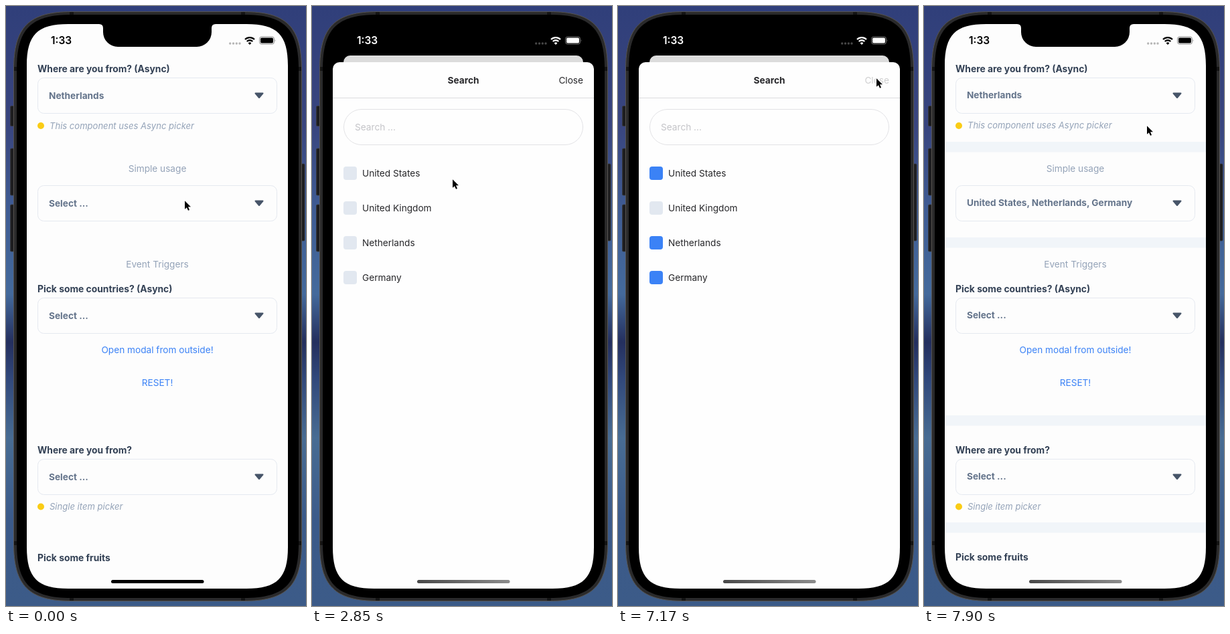
An HTML page that plays this animation: 448 by 897 pixels, repeating every 8000 ms.

```html
<!DOCTYPE html>
<html lang="en">
<head>
<meta charset="utf-8">
<title>Picker demo</title>
<style>
html, body { margin: 0; width: 100%; height: 100%; overflow: hidden; background: #34457f; }
svg { display: block; width: 100vw; height: 100vh; }
text { font: 400 13.65px Inter, "Open Sans", sans-serif; fill: #27272a; white-space: pre; }
.bold { font-weight: 700; }
.label { font-size: 13.85px; fill: #334155; }
.value { fill: #64748b; }
.hint { font-style: italic; font-size: 13.05px; fill: #94a3b8; }
.mid { text-anchor: middle; }
.end { text-anchor: end; }
.muted { fill: #94a3b8; }
.link { fill: #3b82f6; }
.faint { fill: #c4c4c8; }
.clock { font-weight: 600; font-size: 15.5px; fill: inherit; }
</style>
</head>
<body>
<svg viewBox="0 0 448 897" preserveAspectRatio="none">
  <defs>
    <linearGradient id="wall" x2="0" y2="1">
      <stop offset="0" stop-color="#303f7a"/>
      <stop offset=".2" stop-color="#39457f"/>
      <stop offset=".34" stop-color="#3f5c94"/>
      <stop offset=".48" stop-color="#446a9c"/>
      <stop offset=".56" stop-color="#242f5e"/>
      <stop offset=".62" stop-color="#31487b"/>
      <stop offset=".72" stop-color="#486c93"/>
      <stop offset=".86" stop-color="#3b5a8a"/>
      <stop offset="1" stop-color="#3c5b88"/>
    </linearGradient>
    <linearGradient id="bar">
      <stop offset="0" stop-color="#484848"/>
      <stop offset="1" stop-color="#8c8c8c"/>
    </linearGradient>
    <clipPath id="screen"><path id="glass"/></clipPath>
  </defs>

  <rect width="448" height="897" fill="url(#wall)"/>
  <g fill="#1d1d1f" stroke="#3a3a3c" stroke-width=".8">
    <rect x="6.5" y="149.5" width="8" height="30" rx="1.5"/>
    <rect x="6.5" y="213" width="8" height="70" rx="1.5"/>
    <rect x="6.5" y="297" width="8" height="70" rx="1.5"/>
    <rect x="438" y="236" width="8" height="115" rx="1.5"/>
  </g>
  <path id="body" fill="#2a2a2b" stroke="#56534f"/>
  <path d="M12 94h5M436 94h5M12 803h5M436 803h5M98 9v5M354 9v5M98 884v5M354 884v5" stroke="#141414" stroke-width="6"/>
  <path id="bezel"/>

  <g clip-path="url(#screen)">
    <g id="page">
      <rect class="card" x="31" y="27" width="390" height="844" fill="#fdfdfd"/>
      <g id="content"></g>
      <rect class="card" id="dim" x="31" y="27" width="390" height="844"/>
    </g>
    <path d="M139 26v1q6 0 6 6v6a22 22 0 0 0 22 22h118a22 22 0 0 0 22-22v-6q0-6 6-6v-1z"/>
    <g id="status">
      <text class="clock" x="67" y="57">1:33</text>
      <g opacity=".28"><circle cx="334.7" cy="56" r="1.7"/><circle cx="339.5" cy="56" r="1.7"/><circle cx="344.3" cy="56" r="1.7"/><circle cx="349" cy="56" r="1.7"/></g>
      <path d="M357 50a10 10 0 0 1 14 0M359.7 53a6.2 6.2 0 0 1 8.6 0" fill="none" stroke="currentColor" stroke-width="2.3"/>
      <path d="M364 58l-2.4-2.5a3.4 3.4 0 0 1 4.8 0z"/>
      <rect x="378.5" y="46" width="22" height="11" rx="3.2" fill="none" stroke="currentColor" stroke-opacity=".45"/>
      <rect x="380" y="47.5" width="19" height="8" rx="1.8"/>
      <path d="M401.8 49.8q1.5 1.7 0 3.6z" opacity=".5"/>
    </g>
    <g id="sheet"></g>
    <rect id="home" x="157" y="858" width="138.5" height="5" rx="2.5"/>
  </g>
  <path id="cursor" d="M1 1.2V13.8L3.9 11.2 6 15.8 8 14.9 6 10.3H10Z" stroke="#fff" stroke-width="1.8" paint-order="stroke"/>
</svg>
<script>
const LOOP = 8000, OPEN = 1963, CLOSE = 7239.4;
const $ = id => document.getElementById(id);

// Rectangle with smooth, continuous-curvature corners
function squircle(x, y, w, h, r) {
  const a = 1.32 * r, k = .34 * r, d = a - k;
  return `M${x} ${y + a}c0 ${-d} ${k} ${-a} ${a} ${-a}h${w - 2 * a}c${d} 0 ${a} ${k} ${a} ${a}` +
    `v${h - 2 * a}c0 ${d} ${-k} ${a} ${-a} ${a}h${2 * a - w}c${-d} 0 ${-a} ${-k} ${-a} ${-a}z`;
}
$("glass").setAttribute("d", squircle(31, 27, 390, 844, 47));
$("bezel").setAttribute("d", squircle(16, 13, 421, 872, 62));
$("body").setAttribute("d", squircle(11.5, 8.5, 430, 881, 66));

const text = (x, y, cls, s, id = "") => `<text id="${id}" x="${x}" y="${y}" class="${cls}">${s}</text>`;
const label = (y, s) => text(47, y, "bold label", s);
const hint = (y, s) => `<circle cx="52" cy="${y}" r="5" fill="#facc15"/>` + text(65, y + 4.5, "hint", s);
const picker = (y, s, id) =>
  `<rect x="47.5" y="${y + .5}" width="357" height="53" rx="9" fill="none" stroke="#e5e9f0"/>` +
  text(64, y + 31.5, "bold value", s, id) +
  `<path d="M372.5 ${y + 23.5}h11l-5.5 6.5z" fill="#475569" stroke="#475569" stroke-width="2" stroke-linejoin="round"/>`;
const band = y => `<rect x="31" y="${y}" width="390" height="15.5" fill="#f1f5f9"/>`;

$("content").innerHTML =
  `<g id="bands">${[203, 346, 612, 772].map(band).join("")}</g>` +
  label(99, "Where are you from? (Async)") + picker(107, "Netherlands") +
  hint(179, "This component uses Async picker") +
  text(226, 248, "mid muted", "Simple usage") + picker(268, "", "choice") +
  text(226, 391, "mid muted", "Event Triggers") +
  label(428, "Pick some countries? (Async)") + picker(436, "Select ...") +
  text(226, 519, "mid link", "Open modal from outside!") +
  text(226, 568, "mid link", "RESET!") +
  label(669, "Where are you from?") + picker(677, "Select ...") +
  hint(748.5, "Single item picker") +
  label(829.5, "Pick some fruits");

// Countries and the moment each is ticked
const rows = [["United States", 3290], ["United Kingdom", Infinity], ["Netherlands", 4480], ["Germany", 5680]];
$("sheet").innerHTML =
  `<rect x="31" width="390" height="860" rx="10" fill="#fefefe"/>` +
  text(226, 31.5, "mid bold", "Search") + text(405, 31.5, "end", "Close", "close") +
  `<path d="M31 53.5h390" stroke="#dcdcde"/>` +
  `<rect x="47.5" y="70.5" width="357" height="53" rx="26.5" fill="none" stroke="#e2e2e5"/>` +
  text(64, 102, "faint", "Search ...") +
  rows.map(([name], i) => `<rect class="box" x="47" y="${156 + 52 * i}" width="20" height="20" rx="4"/>` +
    text(75, 171 + 52 * i, "", name)).join("");
const boxes = document.querySelectorAll(".box"), cards = document.querySelectorAll(".card");

// Pointer path: time, x, y
const path = [
  [0, 266, 290], [900, 266, 290], [1200, 272, 293], [2250, 272, 293], [2700, 266, 293],
  [2850, 209, 258], [2990, 150, 244], [3140, 118, 246], [3440, 118, 246], [3880, 142, 293],
  [4180, 120, 340], [4630, 120, 346], [4930, 130, 346], [5230, 132, 376], [5380, 122, 400],
  [5680, 122, 402], [6120, 308, 171], [6270, 370, 120], [6420, 383, 108], [6570, 385, 107],
  [7450, 385, 107], [7900, 332, 178], [LOOP, 332, 178]
];
function pointer(t) {
  const i = path.findIndex(k => k[0] > t);
  const [t0, x0, y0] = path[i - 1], [t1, x1, y1] = path[i], u = (t - t0) / (t1 - t0);
  return [x0 + (x1 - x0) * u, y0 + (y1 - y0) * u];
}

const restarts = [7900, 7310, 6120, 3880, 2990, 0];
function hold(t) {
  const a = restarts.find(r => r <= t);
  return a + Math.floor((t - a) / 150) * 150;
}

// Critically damped spring from 0 to 1
function spring(ms) {
  const x = Math.max(0, ms) * .01826;
  return 1 - (1 + x) * Math.exp(-x);
}

function draw(t) {
  const p = spring(t - OPEN) - spring(t - CLOSE);
  const scale = 1 - .082 * p;
  $("page").setAttribute("transform", `translate(226 ${27 + 47 * p}) scale(${scale}) translate(-226 -27)`);
  cards.forEach(c => c.setAttribute("rx", (40 - 30 * p) / scale));
  $("dim").setAttribute("opacity", .13 * p);
  $("sheet").setAttribute("transform", `translate(0 ${871 - 787 * p})`);
  $("sheet").style.display = p > .003 ? "" : "none";

  const light = t > OPEN && t < CLOSE;
  $("status").style.fill = $("status").style.color = light ? "#fff" : "#000";
  $("bands").style.display = t < 1800 ? "none" : "";
  $("home").style.fill = t < 1800 ? "#000" : "url(#bar)";
  $("choice").textContent = t < CLOSE ? "Select ..." : "United States, Netherlands, Germany";
  $("close").style.opacity = t < 7020 ? 1 : .22;
  rows.forEach(([, at], i) => boxes[i].style.fill = t < at ? "#e2e8f0" : "#3b82f6");
  $("cursor").setAttribute("transform", `translate(${pointer(t)})`);
}

function tick() {
  draw(hold(performance.now() % LOOP));
  requestAnimationFrame(tick);
}
tick();
</script>
</body>
</html>
```
